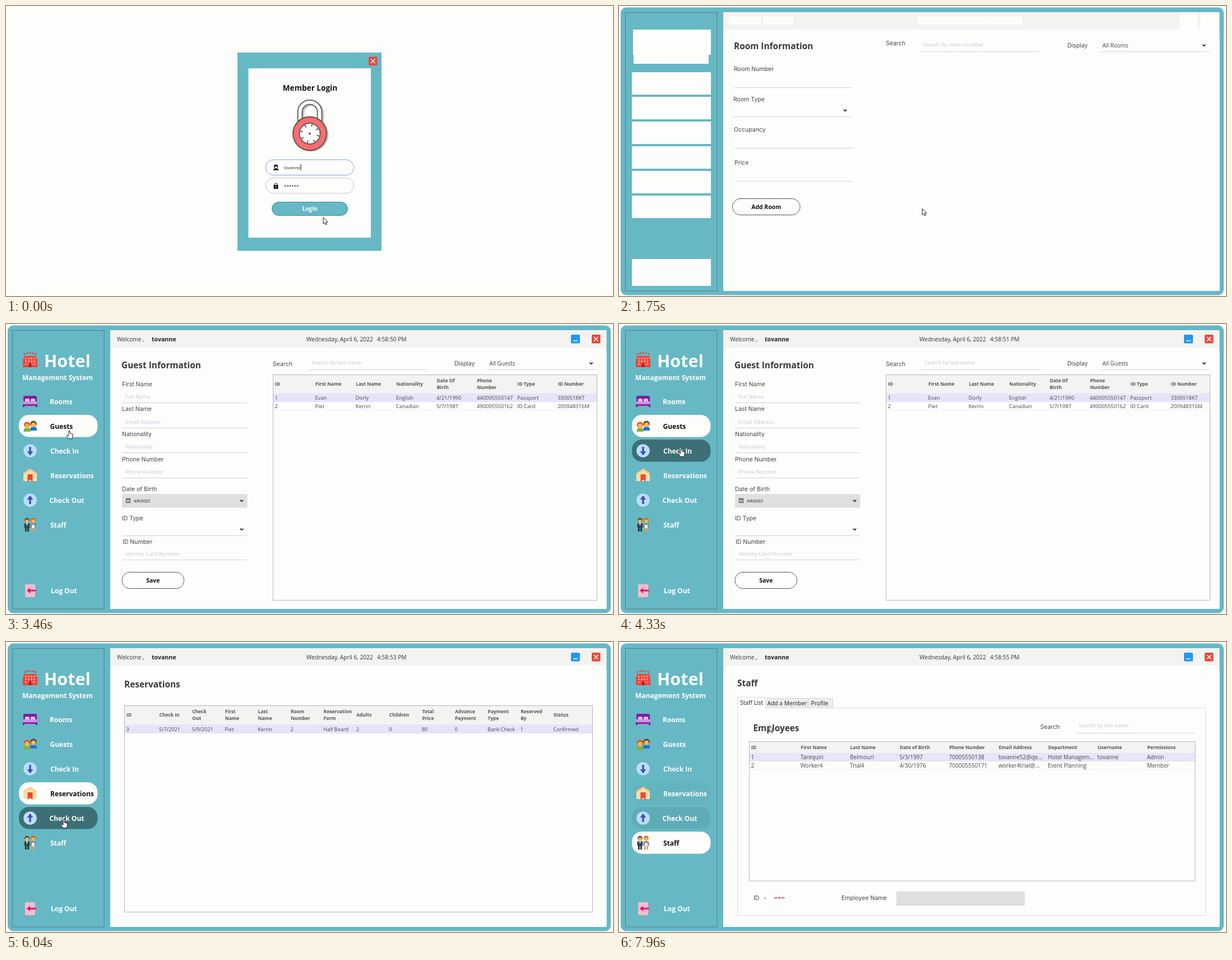
An HTML page with a canvas that plays this animation: 1083x517 px, repeating every 8000 ms.

```html
<!DOCTYPE html>
<html lang="en">
<head>
<meta charset="utf-8">
<title>Hotel Management System</title>
<style>
html, body { margin: 0; width: 100%; height: 100%; overflow: hidden; background: #fdfdfc; }
canvas { display: block; width: 1083px; height: 517px; }
</style>
</head>
<body>
<canvas id="stage" width="1083" height="517"></canvas>
<script>
const c = document.getElementById('stage').getContext('2d');
const LOOP = 8000;
const UI = '"Open Sans", "Noto Sans", sans-serif';
const GEO = 'Inter, Lato, sans-serif';
const TEAL = '#66b8c5', WHITE = '#fdfdfc', PALE = '#f3f3f1', GRAY = '#dfdfde', INK = '#3a3838';
const USER = 'tovanne';

// ---- drawing helpers ----
function text(s, x, y, size, color = '#444', weight = 400, font = UI, align = 'left') {
  c.font = `${weight} ${size}px ${font}`;
  c.fillStyle = color;
  c.textAlign = align;
  c.fillText(s, x, y + size * 0.36);
}
function rect(x, y, x2, y2, fill) {
  c.fillStyle = fill;
  c.fillRect(x, y, x2 - x, y2 - y);
}
function frame(x, y, x2, y2, color) {
  c.strokeStyle = color;
  c.lineWidth = 1;
  c.strokeRect(x + 0.5, y + 0.5, x2 - x - 1, y2 - y - 1);
}
function round(x, y, x2, y2, r, fill, stroke) {
  c.beginPath();
  c.roundRect(x, y, x2 - x, y2 - y, r);
  if (fill) { c.fillStyle = fill; c.fill(); }
  if (stroke) { c.strokeStyle = stroke; c.lineWidth = 1; c.stroke(); }
}
function disc(x, y, r, fill) {
  c.beginPath();
  c.arc(x, y, r, 0, Math.PI * 2);
  c.fillStyle = fill;
  c.fill();
}
function poly(points, fill) {
  c.beginPath();
  points.forEach(([x, y]) => c.lineTo(x, y));
  c.closePath();
  c.fillStyle = fill;
  c.fill();
}
function stroke(points, color, width = 1) {
  c.beginPath();
  points.forEach(([x, y]) => c.lineTo(x, y));
  c.strokeStyle = color;
  c.lineWidth = width;
  c.stroke();
}

// ---- form parts ----
const title = (s, x, y) => text(s, x, y, 15.4, INK, 700);
const label = (s, x, y) => text(s, x, y, 10.5, '#454545', 400, GEO);
const hint = (s, x, y) => text(s, x, y, 9.6, '#c3c9d6');
const rule = (x, x2, y) => rect(x, y, x2, y + 1, '#d3d3da');
const chevron = (x, y) => stroke([[x - 2.7, y - 1.4], [x, y + 1.4], [x + 2.7, y - 1.4]], '#222', 1.6);

function combo(x, x2, y) {
  rule(x, x2, y);
  chevron(x2 - 10.5, y - 11);
}
function readonly(x, y, x2, s = '') {
  rect(x, y, x2, y + 24.5, GRAY);
  rect(x, y + 24, x2, y + 25, '#c9c9cc');
  text(s, x + 6, y + 12.5, 10, '#888');
}
function dateBox(x, y, x2) {
  rect(x, y, x2, y + 24.5, GRAY);
  frame(x + 7, y + 8, x + 15, y + 16, '#444');
  rect(x + 7, y + 8, x + 15, y + 10, '#444');
  rect(x + 9, y + 12, x + 13, y + 14, '#777');
  text('4/6/2022', x + 21, y + 12, 7.5, '#222', 400, '"Liberation Sans", Arial, sans-serif');
  chevron(x2 - 10, y + 12);
}
function button(s, x, y, x2, y2) {
  c.setLineDash([2, 0.8]);
  round(x + 0.5, y + 0.5, x2 - 0.5, y2 - 0.5, 15, WHITE, '#111');
  c.setLineDash([]);
  text(s, (x + x2) / 2, (y + y2) / 2, 10.4, '#111', 700, UI, 'center');
}
function table(o) {
  const { x, y, x2, y2, head, step, cols, rows, size = 9, rowH = 15 } = o;
  const top = y + head, mid = y + head / 2;
  rect(x, y, x2, y2, WHITE);
  rect(x, y, x2, top, PALE);
  cols.forEach((s, i) => {
    const parts = s.split('|'), cx = x + 4 + i * step;
    parts.forEach((p, k) => text(p, cx, mid + (k - (parts.length - 1) / 2) * 11.5, 8.45, '#555', 700));
  });
  rows.forEach((row, r) => {
    const ry = top + r * rowH;
    if (!r) rect(x + 1, ry, x2 - 1, ry + rowH, '#e6e4fa');
    rect(x + 1, ry + rowH - 0.5, x2 - 1, ry + rowH, '#dedee6');
    row.forEach((s, i) => text(s, x + 3.5 + i * step, ry + rowH / 2 + 0.3, size, '#484848'));
  });
  frame(x, y, x2, y2, '#b7b7c0');
}

// ---- pages ----
function searchBar(sy, hintText, hx, lx, all) {
  label('Search', 476, sy);
  hint(hintText, hx, 69);
  rule(lx, lx + 213, 81);
  label('Display', 800, 70);
  text(all, 862.5, 70, 10, '#444');
  combo(857, 1054.5, 81);
}
function rooms(full) {
  title('Room Information', 205, 71);
  label('Room Number', 205, 112);
  rule(205, 416, 145);
  label('Room Type', 204, 166);
  combo(203, 414, 197);
  label('Occupancy', 205, 220);
  rule(206, 418, 253);
  label('Price', 206, 279);
  rule(206, 417, 312);
  button('Add Room', 202, 343, 323.5, 373);
  searchBar(66, 'Search by room number', 542, 536, 'All Rooms');
  if (full) table({
    x: 476, y: 90, x2: 1055, y2: 493, head: 21, step: 96.1,
    cols: ['ID', 'Room Number', 'Room Type', 'Occupancy', 'Price', 'Status'],
    rows: [['1', '1', 'Single', '1', '25', 'Not Reserved'],
           ['2', '2', 'Double', '2', '40', 'Reserved'],
           ['7', '7', 'Double', '2', '30', 'Not Reserved']]
  });
}
function guests(full) {
  title('Guest Information', 206, 73);
  [['First Name', 'Full Name'], ['Last Name', 'Email Address'],
   ['Nationality', 'Nationality'], ['Phone Number', 'Phone Number']].forEach(([a, b], i) => {
    const y = 107 + i * 44.7;
    label(a, 207, y);
    hint(b, 213, y + 22.5);
    rule(207, 431, Math.round(y + 33));
  });
  label('Date of Birth', 207, 294);
  dateBox(207, 303, 430.5);
  label('ID Type', 207, 346);
  combo(207, 431, 377);
  label('ID Number', 208, 388);
  hint('Identity Card Number', 213, 410);
  rule(207, 431, 420);
  button('Save', 206.5, 442, 318, 472);
  searchBar(71, 'Search by last name', 545, 539, 'All Guests');
  table({
    x: 476, y: 90, x2: 1055, y2: 493, head: 34, step: 72.1, size: 9.4,
    cols: ['ID', 'First Name', 'Last Name', 'Nationality', 'Date Of|Birth', 'Phone|Number', 'ID Type', 'ID Number'],
    rows: full ? [['1', 'Evan', 'Dorly', 'English', '4/21/1990', '440005550147', 'Passport', '3300518KT'],
                  ['2', 'Piet', 'Kerrin', 'Canadian', '5/7/1987', '490005550162', 'ID Card', '200948316M']] : []
  });
}
function checkIn() {
  title('Check In', 211, 75);
  label('Client Last Name', 212, 121);
  combo(212, 435.5, 154);
  label('First Name', 502, 121);
  readonly(503, 130.5, 727);
  label('Reservation Form', 808, 121);
  combo(808, 1032, 153);
  label('Room Type', 211, 190.5);
  combo(212, 435.5, 223);
  label('Room Number', 503, 190.5);
  combo(503, 727, 223);
  label('Payment Option', 808, 190.5);
  combo(808, 1031.5, 224);
  label('Price Per Night', 211, 247.5);
  readonly(212, 257, 436);
  label('Occupancy', 503, 247.5);
  readonly(503, 257, 728);
  label('Advance Payment', 806, 247.5);
  rule(805, 1029, 281);
  label('No. of Adults', 211, 307);
  combo(212, 435.5, 340);
  label('No. of Children', 503, 307);
  combo(503, 727.5, 340);
  label('Total Price', 805, 307);
  readonly(805, 317, 1029, '0$');
  label('Check In Date', 211, 370);
  dateBox(211.5, 378.5, 435.5);
  label('Check Out Date', 503, 370);
  dateBox(503.5, 378.5, 727);
  label('Pending Balance', 805, 370);
  readonly(805, 379.5, 1029, '0$');
  label('Number of Nights', 211, 437.5);
  readonly(211, 447, 435.5, '0');
  button('Check In', 907, 441, 1029, 472);
}
const BOOKING = {
  cols: ['ID', 'Check In', 'Check|Out', 'First|Name', 'Last|Name', 'Room|Number', 'Reservation|Form', 'Adults',
         'Children', 'Total|Price', 'Advance|Payment', 'Payment|Type', 'Reserved|By', 'Status'],
  rows: [['3', '5/7/2021', '5/9/2021', 'Piet', 'Kerrin', '2', 'Half Board', '2', '0', '80', '0', 'Bank Check', '1', 'Confirmed']],
  head: 34, step: 58.6, size: 9.1, rowH: 16
};
function reservations(full) {
  title('Reservations', 211, 75);
  table({ ...BOOKING, x: 211, y: 113, x2: 1047, y2: 482, rows: full ? BOOKING.rows : [] });
}
function checkOut(full) {
  title('Check Out', 205, 71);
  label('Room Number', 324, 72);
  combo(324, 548, 109);
  table({ ...BOOKING, x: 211, y: 129, x2: 1032, y2: 319, rows: full ? BOOKING.rows : [] });
  label('Reservation ID', 211, 339.5);
  readonly(211, 349, 434.5);
  label('Advance Payment', 525, 339.5);
  readonly(525, 349, 748.5);
  label('Pending Balance', 809, 339.5);
  readonly(808, 349, 1032);
  label('Client Name', 212, 395);
  readonly(211, 404.5, 435);
  label('Cash', 525, 395);
  rule(525, 748.5, 428);
  label('Change', 809, 395);
  rule(808, 1032, 428);
  label('Total Price', 211, 454);
  readonly(211, 463.5, 435);
  button('Check Out', 910.5, 458, 1032, 488);
}
function staff(full) {
  title('Staff', 211, 73);
  frame(211, 117, 1047, 488, '#dcdce2');
  [[261, 338], [337, 382]].forEach(([a, b]) => {
    rect(a, 100, b, 118, '#ededec');
    frame(a, 100, b, 118, '#d6d6da');
  });
  frame(211, 98, 262, 118, '#dcdce2');
  rect(212, 99, 261, 119, WHITE);
  text('Staff List', 216, 108, 10.3, '#222');
  text('Add a Member', 264.5, 109, 10.3, '#222');
  text('Profile', 342.5, 109, 10.3, '#222');
  title('Employees', 239.5, 153);
  label('Search', 751.5, 151);
  hint('Search by last name', 820, 149);
  rule(814, 1028, 162);
  table({
    x: 232, y: 177, x2: 1028.5, y2: 426.5, head: 21, step: 88.3, size: 10,
    cols: ['ID', 'First Name', 'Last Name', 'Date of Birth', 'Phone Number', 'Email Address', 'Department', 'Username', 'Permissions'],
    rows: full ? [['1', 'Tarequin', 'Belmouri', '5/3/1997', '70005550138', USER + '52@qe...', 'Hotel Managem...', USER, 'Admin'],
                  ['2', 'Worker4', 'Trial4', '4/30/1976', '700005550171', 'worker4trial@...', 'Event Planning', '', 'Member']] : []
  });
  label('ID', 240, 456);
  label('-', 258, 456);
  if (full) for (let i = 0; i < 3; i++) rect(277 + i * 6.7, 455.5, 282 + i * 6.7, 457, '#c2185b');
  label('Employee Name', 397, 456);
  readonly(495, 444.5, 724);
}

// ---- sidebar icons, centred on 0,0 ----
function heads(list) {
  list.forEach(([x, y, hair, shirt]) => {
    round(x - 6, y + 4, x + 6, y + 11, [5, 5, 0, 0], shirt);
    disc(x, y - 1, 5.6, hair);
    disc(x, y + 0.8, 4.2, '#ffb74d');
  });
}
function arrowDisc(dir) {
  disc(0, 0, 11.8, '#bbdefb');
  rect(-1.7, -7, 1.7, 7, '#3f51b5');
  poly([[-5.5, dir], [5.5, dir], [0, dir * 8]], '#3f51b5');
}
function person(x, hair, coat, legs) {
  disc(x, -8, 4.2, hair);
  disc(x, -6.5, 3.2, '#ffb74d');
  round(x - 5, -3, x + 5, 6, 2.5, coat);
  rect(x - 3.5, 5, x - 0.7, 12, legs);
  rect(x + 0.7, 5, x + 3.5, 12, legs);
}
const icons = [
  () => {
    round(-12, -10, 12, 4, [3, 3, 0, 0], '#7b1fa2');
    round(-9, -5, -1, 2, 2, '#e1bee7');
    round(1, -5, 9, 2, 2, '#e1bee7');
    rect(-12, 0, 12, 6, '#ce93d8');
    rect(-13, 5, 13, 8, '#8e24aa');
    rect(-13, 8, -10, 10, '#6a1b9a');
    rect(10, 8, 13, 10, '#6a1b9a');
  },
  () => heads([[6, -3, '#5d4037', '#1976d2'], [-5.5, -1, '#e65100', '#7cb342']]),
  () => arrowDisc(1),
  () => {
    poly([[-12, -4], [0, -12], [12, -4], [12, 10], [-12, 10]], '#ffe0a8');
    poly([[-12, -4], [0, -12], [12, -4], [12, -1], [0, -8], [-12, -1]], '#ffcc80');
    poly([[-4.5, -2], [4.5, -2], [4.5, 11], [0, 7.5], [-4.5, 11]], '#f44336');
  },
  () => arrowDisc(-1),
  () => {
    person(-5.5, '#4e342e', '#37474f', '#263238');
    poly([[-7, -3], [-4, -3], [-5.5, 2]], '#fff');
    person(5.5, '#e65100', '#78909c', '#d7a06a');
    rect(3, 0, 8, 6, '#eceff1');
  }
];
function hotelIcon() {
  rect(32, 57, 54, 77, '#f44336');
  rect(30, 62, 56, 77, '#f44336');
  for (let i = 0; i < 5; i++) disc(33 + i * 5, 53.5 - 2 * Math.sin(i * Math.PI / 4), 1.5, '#e53935');
  for (let r = 0; r < 3; r++)
    for (let k = 0; k < 4; k++) rect(34 + k * 5, 60 + r * 5, 37 + k * 5, 63 + r * 5, '#ff9a90');
  rect(40.5, 70, 45.5, 77, '#b71c1c');
}
function logOut() {
  round(34, 464, 52, 487, 2, '#f8bbd0');
  rect(41, 473.7, 53.5, 476.7, '#d81b60');
  poly([[37, 475.2], [43, 470.2], [43, 480.2]], '#d81b60');
  text('Log Out', 80, 475.5, 12, WHITE, 700);
}

// ---- timeline ----
const MENU = ['Rooms', 'Guests', 'Check In', 'Reservations', 'Check Out', 'Staff'];
const MENU_X = [78, 78.5, 79, 79, 77.5, 79];
const PAGES = [rooms, guests, checkIn, reservations, checkOut, staff];
const CLICKS = [0, 3210, 4370, 5420, 6370, 7500];
const FULL = [1990, 3250, 4410, 5460, 6410, 7790];
const PATH = [
  [0, 566, 377], [40, 566, 377], [460, 541, 361], [2270, 541, 361], [2880, 115, 195], [3040, 113, 190],
  [3500, 113, 190], [3960, 111, 222], [4500, 111, 222], [4960, 113, 276], [5630, 113, 276],
  [6080, 103, 318], [6460, 103, 318], [6710, 102, 328], [7130, 100, 358], [7770, 100, 358],
  [7950, 268, 149], [LOOP, 268, 149]
];
function mouse(t) {
  const i = Math.max(1, PATH.findIndex(p => p[0] > t));
  const [t0, x0, y0] = PATH[i - 1], [t1, x1, y1] = PATH[i];
  const u = Math.min(1, Math.max(0, (t - t0) / (t1 - t0))), e = u * u * (3 - 2 * u);
  return [x0 + (x1 - x0) * e, y0 + (y1 - y0) * e];
}
const itemY = i => 118 + i * 44;
function itemAt(t) {
  const [x, y] = mouse(t);
  if (t < 2000 || x < 23 || x > 164) return -1;
  return MENU.findIndex((_, i) => y >= itemY(i) && y <= itemY(i) + 40);
}
// share of the last 180 ms spent over an item
function hoverLevel(t, i) {
  let n = 0;
  for (let k = 0; k < 18; k++) if (itemAt(t - k * 10) === i) n++;
  return n / 18;
}

// ---- scenes ----
function padlock() {
  const body = '#5b5650', shade = '#c6c4bb';
  const shackle = (x, y, edge, fill) => {
    c.beginPath();
    c.moveTo(x - 17.5, y + 38);
    c.lineTo(x - 17.5, y);
    c.arc(x, y, 17.5, Math.PI, 0);
    c.lineTo(x + 17.5, y + 38);
    c.lineWidth = 9.5;
    c.strokeStyle = edge;
    c.stroke();
    c.lineWidth = 6;
    c.strokeStyle = fill;
    c.stroke();
  };
  shackle(545, 191, shade, shade);
  disc(545, 229, 30.5, shade);
  shackle(542, 189, body, '#fff');
  disc(542, 227.5, 31, body);
  disc(542, 227.5, 29, '#fc6c70');
  disc(542, 227.5, 19.5, body);
  disc(542, 227.5, 17.7, '#fff');
  disc(542, 227.5, 2, body);
  for (let i = 0; i < 8; i++) {
    const a = i * Math.PI / 4 + 0.25, dx = Math.cos(a), dy = Math.sin(a);
    stroke([[542 + dx * 13, 227.5 + dy * 13], [542 + dx * 17.5, 227.5 + dy * 17.5]], body, 1.8);
  }
}
function closeBox(x, y) {
  round(x, y, x + 15.5, y + 15.5, 2, '#f04438');
  stroke([[x + 4, y + 4], [x + 11.5, y + 11.5]], '#fff', 1.7);
  stroke([[x + 11.5, y + 4], [x + 4, y + 11.5]], '#fff', 1.7);
}
const onLogin = t => {
  const [x, y] = mouse(t);
  return t < 1460 && x > 474 && x < 610 && y > 349 && y < 374;
};
function login(t) {
  const focus = t < 790;
  rect(413, 83, 670, 436.5, TEAL);
  rect(432.5, 111, 651, 413, WHITE);
  closeBox(647, 90.5);
  text('Member Login', 542.5, 146, 13.6, '#111', 700, UI, 'center');
  padlock();
  round(463.5, 274, 620.5, 301.5, 13.7, WHITE, focus ? '#7ba3dc' : '#c4c4cc');
  round(463.5, 306.5, 620.5, 334, 13.7, WHITE, '#c4c4cc');
  disc(481.5, 286, 3.6, '#111');
  disc(481.5, 287, 2, '#fff');
  rect(479, 283.4, 484, 286, '#111');
  round(477, 289.5, 486, 293, [3, 3, 0, 0], '#111');
  round(479.2, 315.8, 483.8, 323, 2.3, null, '#111');
  round(477.5, 319, 485.5, 326, 1, '#111');
  rect(481, 321, 482, 324, '#fff');
  text(USER, 496, 288, 7.7, '#222');
  if (focus) {
    c.font = `400 7.7px ${UI}`;
    rect(496.5 + c.measureText(USER).width, 282, 497.5 + c.measureText(USER).width, 293, '#111');
  }
  text('******', 496, 321, 8, '#222');
  round(474.5, 349.5, 609.5, 373.5, 12, onLogin(t) ? '#58a5b2' : TEAL, '#35919c');
  text('Login', 542.3, 361.5, 10, WHITE, 700, UI, 'center');
}

function sidebar(t, active, ready) {
  frame(11, 11, 175.5, 508.5, '#537f88');
  if (ready(1)) {
    hotelIcon();
    text('Hotel', 68, 66.5, 30.5, WHITE, 700);
    text('Management System', 29, 96, 12, WHITE, 700);
  } else {
    rect(25, 42, 164, 87, WHITE);
    rect(26, 86, 160, 103, WHITE);
  }
  MENU.forEach((name, i) => {
    const y = itemY(i), on = i === active;
    if (!ready(1.5 + i * 0.5)) return rect(23, y, 164, y + 40, WHITE);
    const h = on ? 0 : hoverLevel(t, i);
    if (on) round(23, y, 163.5, y + 39.5, 18, WHITE);
    else if (h) round(23, y, 163.5, y + 39.5, 18, `rgba(0,0,0,${0.4 * h})`);
    c.save();
    c.translate(43, y + 20);
    icons[i]();
    c.restore();
    text(name, MENU_X[i], y + 20.5, 12, on ? '#111' : WHITE, 700);
  });
  if (ready(5)) logOut();
  else rect(23, 451, 164, 499, WHITE);
}
function header(t, done) {
  if (!done) {
    [[196, 253], [257, 311], [533, 659], [660, 720]].forEach(([a, b]) => rect(a, 19, b, 33, WHITE));
    rect(1000, 11, 1033, 43, WHITE);
    rect(1037, 11, 1071, 43, WHITE);
    return;
  }
  text('Welcome ,', 198, 27, 10.1, '#333');
  text(USER, 260, 27, 10.6, '#222', 700);
  text('Wednesday, April 6, 2022', 536, 27, 10.2, '#333');
  text(`4:58:${49 + Math.max(0, Math.floor((t - 1790) / 1010))} PM`, 662, 27, 10.2, '#333');
  round(1008, 19, 1024, 34.5, 2, '#2196f3');
  rect(1012, 29, 1020, 30.5, '#fff');
  closeBox(1045, 19);
}
function dashboard(t) {
  const ready = n => t >= 1750 + n * 40;
  let active = 0;
  CLICKS.forEach((at, i) => { if (t >= at) active = i; });
  round(3, 2.5, 1079, 515.5, 10, TEAL);
  rect(186, 11, 1071.5, 508, PALE);
  round(186, 42, 1071.5, 508, [10, 10, 4, 0], WHITE);
  header(t, ready(5));
  sidebar(t, active, ready);
  PAGES[active](t >= FULL[active]);
}

function pointer(t) {
  const [x, y] = mouse(t);
  c.save();
  c.translate(x, y);
  c.lineJoin = 'round';
  c.beginPath();
  if (itemAt(t) >= 0 || onLogin(t)) {
    c.moveTo(-1.2, 8);
    c.lineTo(-1.2, 1);
    c.quadraticCurveTo(0, -1, 1.2, 1);
    c.lineTo(1.2, 4.8);
    c.lineTo(6, 6);
    c.lineTo(6.2, 10);
    c.lineTo(4.8, 14.5);
    c.lineTo(-1.6, 14.5);
    c.lineTo(-4.8, 9);
    c.quadraticCurveTo(-4, 6.6, -1.2, 9);
  } else {
    [[0, 0], [0, 11.5], [2.6, 9], [4.4, 13], [6.2, 12.2], [4.4, 8.4], [8, 8.2]].forEach(p => c.lineTo(...p));
  }
  c.closePath();
  c.fillStyle = '#fff';
  c.fill();
  c.strokeStyle = '#222';
  c.lineWidth = 1;
  c.stroke();
  c.restore();
}

function draw(t) {
  c.globalAlpha = 1;
  rect(0, 0, 1083, 517, WHITE);
  if (t < 1460) {
    c.globalAlpha = t < 1420 ? 1 : 0.5;
    login(t);
  } else if (t >= 1670) {
    c.globalAlpha = t < 1710 ? 0.4 : t < 1750 ? 0.8 : 1;
    dashboard(t);
  }
  c.globalAlpha = 1;
  pointer(t);
}

const start = performance.now();
function tick() {
  draw((performance.now() - start) % LOOP);
  requestAnimationFrame(tick);
}
tick();
</script>
</body>
</html>
```
